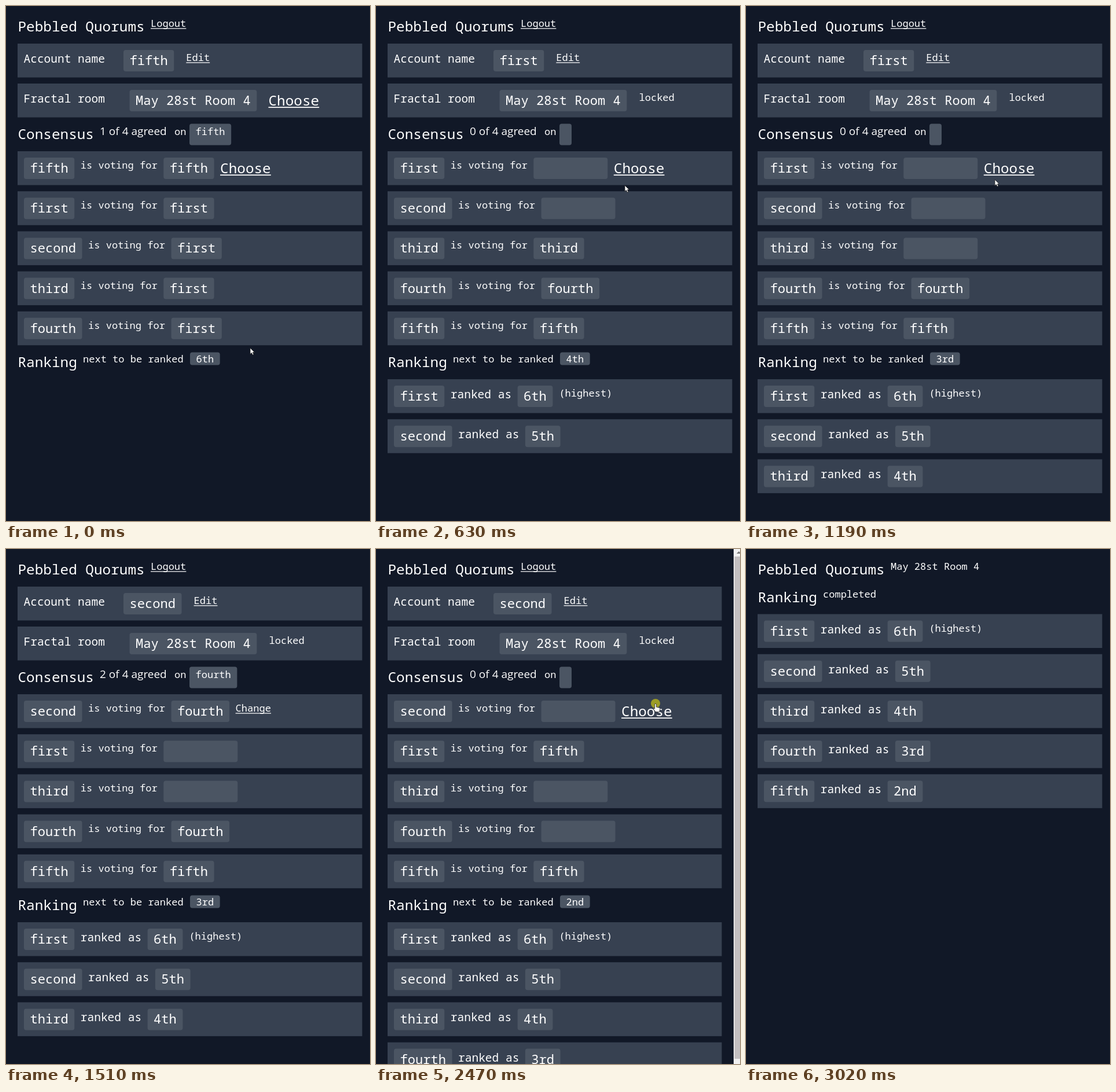
These frames come from a looping animation (629x890 px, 3.17 s). An HTML page:

```html
<!DOCTYPE html>
<html lang="en">
<head>
<meta charset="utf-8">
<title>Ranking room</title>
<style>
html, body { margin: 0; width: 100%; height: 100%; overflow: hidden; background: #111827; }
svg { display: block; width: 629px; height: 890px; fill: #fff; font-family: "Noto Sans Mono", "DejaVu Sans Mono", monospace; }
.sans { font-family: "Open Sans", "Noto Sans", sans-serif; }
</style>
</head>
<body>
<svg id="stage" viewBox="0 0 629 890"></svg>
<script>
const NAMES = ['', 'first', 'second', 'third', 'fourth', 'fifth'];
const PLACES = ['6th', '5th', '4th', '3rd', '2nd'];
const ROOM = 'May 28st Room 4';
const BG = '#111827', ROW = '#374151', CHIP = '#4b5563';
const BIG = 24.35, MID = 22.1, LABEL = 19.5, SMALL = 17.05;
const PITCH = 69.2, GROW = 5.5;

// account, places given, vote of each member, mode, pointer (a = arrow, h = hand, p = press), x, y
// modes: C choose, o open list, g vote given, d done
const STATES = `5 0 11115 C a 422 591
5 0 11115 o h 335 326
1 1 02345 C h 452 277
1 1 22345 g a 440 300
3 1 22345 C h 435 278
3 1 22345 o h 335 327
3 1 22245 g a 420 300
4 1 22245 o h 348 326
1 2 00345 C a 430 310
2 2 00345 C a 440 330
4 2 00345 C h 430 277
4 2 00345 o p 348 326
4 2 00335 g a 410 310
5 2 00335 o h 340 326
1 2 00333 o p 330 326
1 3 00045 C a 430 300
2 3 00045 C a 440 300
2 3 00045 C h 465 277
2 3 04045 g a 440 300
2 3 04045 g - 0 0
3 3 04045 C h 455 277
3 3 04445 g a 410 310
5 3 04445 o p 340 326
5 4 00005 C a 420 330
4 4 00005 C a 410 360
1 4 00005 C a 405 385
1 4 00005 C a 404 394
1 4 00005 C h 452 277
1 4 00005 o p 325 326
1 4 50005 g a 420 300
2 4 50005 C a 460 310
2 4 50005 C p 483 267
2 4 50005 o h 335 326
2 4 55005 g a 420 300
3 4 55005 C h 455 277
3 4 55005 o p 325 326
4 4 55505 o h 340 326
1 5 00000 d - 0 0
1 5 00000 d - 0 0`.split('\n').map(line => line.split(' '));

const stage = document.getElementById('stage');
const textWidth = (s, size) => s.length * size * 0.6;
const rect = (x, y, w, h, fill, r = 0) =>
  `<rect x="${x}" y="${y}" width="${w}" height="${h}" rx="${r}" fill="${fill}"/>`;
const text = (s, x, y, size, attrs = '') =>
  `<text x="${x}" y="${y}" font-size="${size}" ${attrs}>${s}</text>`;
const link = (s, x, y, size) =>
  text(s, x, y, size) + rect(x, y + 2.3, textWidth(s, size), size / 14, '#fff');

const chipWidth = (s, size = MID) => textWidth(s, size) + 21;
const chip = (s, x, y, h = 37) =>
  rect(x, y + 11, s ? chipWidth(s) : 128, h, CHIP, 4) + text(s, x + 10.5, y + 37, MID);

function pointer(kind, x, y) {
  if (kind === '-') return '';
  const shape = kind === 'a'
    ? 'M0 0V10.5L2.4 8.3 4.1 12 6 11.2 4.4 7.6H7.5Z'
    : 'M-1.3 1Q0-.6 1.3 1V6L6.5 7.3Q8 7.8 7.7 9.5L6.8 14.5H0L-3.6 9.6Q-3.6 7.6-1.3 9Z';
  const press = kind === 'p' ? `<circle cx="${x}" cy="${y}" r="8" fill="rgba(200,195,20,.7)"/>` : '';
  return press + `<path d="${shape}" transform="translate(${x} ${y})" stroke="#222" stroke-width=".8"/>`;
}

function ranking(y, count, rowWidth) {
  let out = '';
  for (let i = 0; i < count; i++, y += PITCH) {
    const x = 31 + chipWidth(NAMES[i + 1]) + 10.5;
    const placeX = x + textWidth('ranked as', LABEL) + 10.5;
    out += rect(20, y, rowWidth, 58.5, ROW) + chip(NAMES[i + 1], 31, y)
      + text('ranked as', x, y + 33, LABEL) + chip(PLACES[i], placeX, y);
    if (!i) out += text('(highest)', placeX + chipWidth(PLACES[0]) + 11, y + 30, SMALL);
  }
  return out;
}

function openVote(x, vote, ranked, hover) {
  const name = NAMES[vote], w = textWidth(name, LABEL) + 69;
  const options = NAMES.filter((n, i) => i > ranked && i !== vote);
  const menuWidth = Math.max(...options.map(n => textWidth(n, SMALL))) + 43;
  return rect(x, 262, w, 42, CHIP, 4)
    + text(name, x + 21, 290, LABEL, 'font-weight="700"')
    + `<path d="M${x + w - 37} 280.5l5 5 5-5" fill="none" stroke="#fff" stroke-width="2"/>`
    + link('Cancel', x + w + 11, 290, SMALL)
    + options.map((n, i) => rect(x, 309.5 + i * 48, menuWidth, 48, i === hover ? '#9ca3af' : CHIP)
      + text(n, x + 21.5, 339 + i * 48, SMALL)).join('');
}

function voting(account, ranked, votes, mode, rowWidth, hover) {
  const order = [account, ...[1, 2, 3, 4, 5].filter(n => n !== account)];
  let out = '', top = '';
  order.forEach((member, i) => {
    const open = mode === 'o', grow = open && !i ? GROW : 0;
    const y = 251 + i * PITCH + (open && i ? GROW : 0);
    const name = NAMES[member], vote = votes[member - 1];
    const x = 31 + chipWidth(name) + 10.5;
    const voteX = x + textWidth('is voting for', SMALL) + 10.5;
    const end = voteX + (vote ? chipWidth(NAMES[vote]) : 128) + 10.5;
    out += rect(20, y, rowWidth, 58.5 + grow, ROW) + chip(name, 31, y, 37 + grow)
      + text('is voting for', x, y + 30, SMALL);
    if (grow) top = openVote(voteX, vote, ranked, hover);
    else out += chip(NAMES[vote], voteX, y);
    if (!i && mode === 'C') out += link('Choose', end, y + 38, BIG);
    if (!i && mode === 'g') out += link('Change', end, y + 30, SMALL);
  });
  return out + top;
}

function scrollbar() {
  return rect(618, 0, 11, 890, '#f1f1f1') + rect(619.5, 13, 9.5, 868, '#c3bfc0')
    + '<path d="M623 8l4-4 4 4z" fill="#777"/>';
}

function draw([account, ranked, votes, mode, kind, px, py]) {
  account = +account; ranked = +ranked; votes = [...votes].map(Number);
  px = +px; py = +py;
  const title = rect(0, 0, 629, 890, BG) + text('Pebbled Quorums', 20.5, 44, BIG);
  if (mode === 'd') {
    return title + text(ROOM, 250, 36, SMALL) + text('Ranking', 20.5, 92, BIG)
      + text('completed', 133, 84, SMALL) + ranking(112.5, 5, 595.5);
  }
  const scrolls = ranked > 3, rowWidth = scrolls ? 577.5 : 595.5;
  const name = NAMES[account], vote = votes[account - 1], choice = NAMES[vote];
  const agreed = vote ? votes.filter(v => v === vote).length : 0;
  const shift = mode === 'o' ? GROW : 0, place = PLACES[ranked];
  return title + link('Logout', 250, 36, SMALL)
    + rect(20, 65, rowWidth, 58.5, ROW) + text('Account name', 30.5, 98, LABEL)
    + chip(name, 203, 65) + link('Edit', 203 + chipWidth(name) + 21, 95, SMALL)
    + rect(20, 134, rowWidth, 58.5, ROW) + text('Fractal room', 30.5, 167, LABEL)
    + chip(ROOM, 213.5, 134)
    + (ranked ? text('locked', 454.5, 164, SMALL) : link('Choose', 453.5, 172, BIG))
    + text('Consensus', 20.5, 230, BIG)
    + text(`${agreed} of 4 agreed`, 162, 222.5, 19, 'class="sans"') + text('on', 291, 222.5, SMALL)
    + rect(317, 203.5, chipWidth(choice, SMALL), 37, CHIP, 4) + text(choice, 327.5, 222.5, SMALL)
    + text('Ranking', 20.5, 624 + shift, BIG) + text('next to be ranked', 133, 616 + shift, SMALL)
    + rect(318, 598.5 + shift, chipWidth(place, SMALL), 22, CHIP, 4)
    + text(place, 328.5, 616 + shift, SMALL)
    + ranking(645 + shift, ranked, rowWidth)
    + voting(account, ranked, votes, mode, rowWidth, Math.floor((py - 309.5) / 48))
    + (scrolls ? scrollbar() : '') + pointer(kind, px, py);
}

let shown = -1;
const start = performance.now();
function tick() {
  const t = (performance.now() - start) % 3170;
  const lead = (t >= 310) * 10 + (t >= 2860) * 10;
  const step = Math.min(38, Math.floor((t + lead) / 80));
  if (step !== shown) stage.innerHTML = draw(STATES[shown = step]);
  requestAnimationFrame(tick);
}
tick();
</script>
</body>
</html>
```
